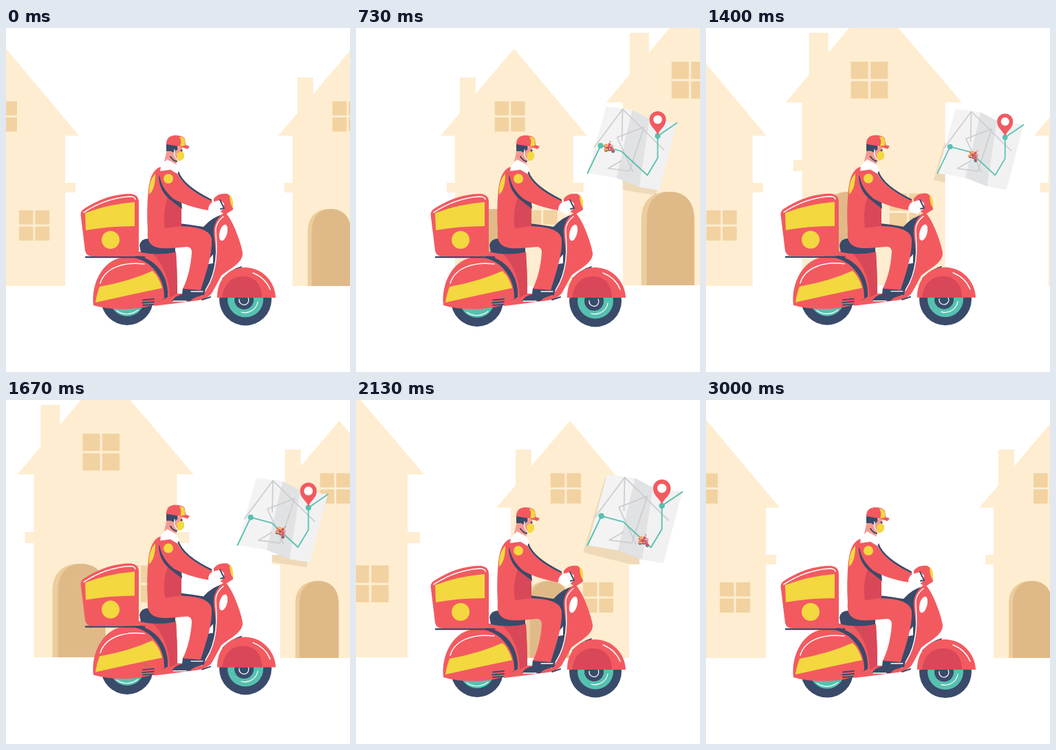
Recreate the animation shown at these times as an HTML page with a canvas. Size 500 by 500 pixels, loop 3030 ms.

```html
<!DOCTYPE html>
<html lang="en">
<head>
<meta charset="utf-8">
<title>Delivery ride</title>
<style>
html, body { margin: 0; width: 100%; height: 100%; overflow: hidden; background: #fff; }
canvas { display: block; width: 500px; height: 500px; }
</style>
</head>
<body>
<canvas width="500" height="500"></canvas>
<script>
const ctx = document.querySelector('canvas').getContext('2d');
const LOOP = 3030, STEP = 100 / 3;
const RED = '#f25a60', DARK = '#d94858', NAVY = '#3a4a6a', YELLOW = '#f3d83f',
  TEAL = '#56c1b0', SKIN = '#f59a92', WALL = '#feedd0', PANE = '#f2d2a0',
  DOOR = '#dfba88', FRAME = '#eccd9b', ROAD = '#cccdd0';

const fill = (color, d) => { ctx.fillStyle = color; ctx.fill(new Path2D(d)); };
const line = (color, width, d) => {
  ctx.strokeStyle = color; ctx.lineWidth = width; ctx.stroke(new Path2D(d));
};
const dot = (color, x, y, r) => {
  ctx.fillStyle = color; ctx.beginPath(); ctx.arc(x, y, r, 0, 7); ctx.fill();
};
const at = (x, y, draw) => { ctx.save(); ctx.translate(x, y); draw(); ctx.restore(); };

// Smoothly interpolates between [step, value] pairs.
function ease(keys, n) {
  const i = keys.findIndex(k => k[0] >= n);
  if (i < 0) return keys[keys.length - 1][1];
  if (i === 0) return keys[0][1];
  const [a, u] = keys[i - 1], [b, v] = keys[i];
  return u + (v - u) * (1 - Math.cos(Math.PI * (n - a) / (b - a))) / 2;
}

function panes(x, y, size, pitch) {
  ctx.fillStyle = PANE;
  for (let i = 0; i < 4; i++)
    ctx.fillRect(x + (i & 1) * pitch, y + (i >> 1) * pitch, size, size);
}

function smallHouse() {
  fill(WALL, 'M0 30L106 156.500H86V225H101V239H86V375H-86V239H-98V225H-86V156.500H-107L-79 124V72H-56V96Z');
  panes(-28, 106.5, 20.5, 23.5);
  panes(19, 265, 20.5, 23.5);
  fill(FRAME, 'M-64 375V296C-64 274 -51 263 -32 263S-1 274 -1 296V375Z');
  fill(DOOR, 'M-58 375V296C-58 274 -46 263 -30 263S-1 274 -1 296V375Z');
}

function bigHouse() {
  fill(WALL, 'M-36 0H36L128 108H104V192H122V208H104V374H-104V208H-117V192H-104V108H-128L-94 68V7H-66V36Z');
  panes(-33, 49, 25, 28.5);
  panes(23, 240.5, 25, 28.5);
  fill(FRAME, 'M-77 374V278C-77 251 -61 238 -38 238S0 251 0 278V374Z');
  fill(DOOR, 'M-69 374V278C-69 251 -55 238 -35 238S0 251 0 278V374Z');
}

function wheels() {
  dot(NAVY, 176, 394, 38);
  dot(TEAL, 176, 394, 25);
  line('#fff', 1.2, 'M161 411Q176 421 192 410');
  dot(NAVY, 348, 394.5, 38);
  dot(TEAL, 348, 394.5, 26);
  line('#fff', 1.2, 'M366 398A19 19 0 0 1 342 413');
  dot(NAVY, 346, 395, 14);
  line('#fff', 1.2, 'M352 392A7 7 0 1 1 339 394');
}

function scooter() {
  // Inner shield and far leg
  fill(NAVY, 'M252 284Q270 286 287 289Q300 274 319 270L307 300Q314 345 302 374L290 390H262L275 370L290 320Q296 300 253 291Z');
  fill('#fff', 'M301 329L288 344L301 342Z');
  fill(NAVY, 'M314 364Q328 350 343 346L340 356L318 374Z');
  // Rear body and floor
  fill(RED, 'M190 325H247Q249 355 249 386L284 387Q301 372 305 342C307 316 299 302 303 287Q308 273 318 268C330 277 344 320 344 328C344 342 322 352 313 360L301 382Q296 393 278 396L240 401L215 404Z');
  fill(DARK, 'M212 327H247Q249 355 249 386L238 392Q237 350 212 327Z');
  line('#fff', 1.5, 'M316 274Q303 284 305 299C308 335 304 366 284 389');
  line(NAVY, 2, 'M285 395L297 391');
  fill(NAVY, 'M170 330C208 326 237 352 235 391L224 397Z');
  fill(RED, 'M127 403C123 372 141 333 176 333C207 333 231 360 230 393L222 399C198 411 154 411 127 403Z');
  line('#fff', 1.5, 'M137 371C143 350 169 339 201 343');
  fill(YELLOW, 'M136 376Q180 368 213 353Q222 361 227 378Q178 388 130 399Q132 386 136 376Z');
  line(NAVY, 1.8, 'M199 395.500L215 394M198 399.500L215 398M199 403L214 402');
  // Seat and cargo box
  fill(NAVY, 'M194 316Q196 306 207 306L246 318V326Q220 331 196 326Z');
  line(NAVY, 2.5, 'M116 333H201');
  fill(RED, 'M113 263Q147 241 181 241Q193 242 193 253V326Q193 332 187 332H126Q117 332 115 324L109 275Q107 267 113 263Z');
  line('#fff', 1.5, 'M113 268Q145 247 180 245Q187 245 188 249');
  fill(YELLOW, 'M115 269Q149 256 187 253V288Q149 288 116 294Z');
  dot(YELLOW, 152, 308, 13);
  // Front fender
  fill(RED, 'M307 392C306 365 325 348 347 348C372 348 391 368 392 392Z');
  fill(DARK, 'M314 392C317 371 328 361 345 361C362 361 372 374 372 392Z');
  line('#fff', 1.5, 'M359 356Q377 363 384 380');
  // Steering head
  fill(RED, 'M302 248Q309 239 322 241Q330 246 330 264L319 271L302 262Z');
  fill(YELLOW, 'M325 242Q331 247 330 262Q325 256 325 242Z');
  ctx.fillStyle = '#fff';
  ctx.beginPath();
  ctx.ellipse(316, 297.5, 5.5, 12, 0.25, 0, 7);
  ctx.fill();
}

function courier() {
  // Shoes, legs, torso
  fill(NAVY, 'M241 397Q246 389 256 387L257 378H270Q280 382 290 379L288 388Q272 391 268 397Z');
  line('#fff', 1.3, 'M269 383H286M243 397H262');
  fill(RED, 'M224 202Q210 207 207 235Q204 265 206 295C204 315 214 322 240 320L264 318Q270 319 270 326C269 343 265 363 257 379L283 381C291 355 300 330 299 307C297 292 275 289 255 288V240L247 207Z');
  fill(DARK, 'M235 246Q227 268 231 291L255 288V252Z');
  fill(YELLOW, 'M217 212Q207 222 208 242Q217 235 217 212Z');
  // Arm
  fill(NAVY, 'M222 214Q222 236 238 249Q248 257 256 263L255 252L235 234Z');
  fill(RED, 'M223 209Q235 201 248 209Q256 231 300 252L294 265Q261 259 243 248Q223 231 223 209Z');
  line(NAVY, 2.5, 'M250 209Q257 230 298 250');
  dot(YELLOW, 236, 219, 7);
  fill('#fff', 'M294 262Q296 253 304 252L311 250L317 255L316 263L307 271Q299 268 294 264Z');
  line(NAVY, 2, 'M311 250L317 262L312 263');
  // Head
  fill(SKIN, 'M234 176L256 172L257 187L248 194L247 204L230 194Z');
  fill('#fff', 'M225 201L234 191L247 198L252 206L249 212L239 206L224 208Z');
  fill(NAVY, 'M233 166L250 168L249 177L243 181L240 179H233Z');
  line(NAVY, 2, 'M239 187Q243 193 248 194');
  line('#fff', 1.3, 'M245 177Q243 187 250 192');
  fill(YELLOW, 'M248 183L254 179L259 182L259 188Q256 194 250 193Z');
  dot(NAVY, 255, 178, 1.5);
  fill(RED, 'M233 169Q233 157 245 156Q257 156 260 161L261 170L267 172L264 176L251 172L233 169Z');
  fill(YELLOW, 'M252 158Q260 158 260 164V171L253 172Q256 165 252 158Z');
}

function rider(wheelY) {
  at(0, wheelY, wheels);
  at(0, Math.min(0, wheelY * 0.85), () => { scooter(); courier(); });
}

const ROUTE = [[355, 172], [385, 180], [423, 215], [438, 190], [438, 158]];

function alongRoute(dist) {
  for (let i = 1; i < ROUTE.length; i++) {
    const [x, y] = ROUTE[i - 1], dx = ROUTE[i][0] - x, dy = ROUTE[i][1] - y;
    const len = Math.hypot(dx, dy);
    if (dist <= len) return [x + dx * dist / len, y + dy * dist / len];
    dist -= len;
  }
  return ROUTE[ROUTE.length - 1];
}

const PULSE = [[0, 1], [22, 1], [34, .915], [50, 1.01], [64, 1.06], [76, .915], [90, 1]];
const POP = [[5, 0], [13, 1], [80, 1], [88, 0]];
const TILT = [[22, .15], [34, .6], [50, .65], [64, .3], [76, .15]];
const BOUNCE = [[0, 0], [8, -3], [16, .5], [22, 2], [33, 4], [50, -4], [57, 4],
  [64, 0], [70, 4], [76, 0], [83, 3], [90, .6]];

function mapSheet(n) {
  const pop = ease(POP, n), pulse = ease(PULSE, n);
  if (pop <= 0) return;
  ctx.save();
  ctx.translate(400, 176);
  ctx.scale(pop, pop);
  ctx.translate(-400, -176);
  ctx.translate(336.5, 211);
  ctx.scale(pulse, pulse);
  ctx.translate(-336, -212);
  // The shadow falls on the houses only
  ctx.globalCompositeOperation = 'source-atop';
  fill('rgba(190,160,110,.24)', 'M360 120L465 145L435 244L390 237L330 222Z');
  ctx.globalCompositeOperation = 'source-over';
  fill('#f3f3f4', 'M363 115L401 120L378 219L336 212Z');
  fill('#e1e2e4', 'M401 120L426 133L411 232L378 219Z');
  fill('#f1f1f2', 'M426 133L466 139L440 237L411 232Z');
  line(ROAD, 1.7, 'M346 174L387 119L386 164M387 119L447 178M402 210L379 160L418 145L397 209L366 205L385 194');
  line(TEAL, 1.8, 'M336 212L355 172L385 180L423 215L438 190V158L466 139');
  dot(TEAL, 355, 172, 4);
  dot(TEAL, 438, 158, 4);
  fill(RED, 'M438 157C436 148 426 145 426 134A12 12 0 0 1 450 134C450 145 440 148 438 157Z');
  dot('#fff', 438, 134, 6.3);
  const [x, y] = alongRoute(Math.max(0, 1.36 * (n - 12)));
  ctx.translate(x, y - 2);
  ctx.rotate(ease(TILT, n));
  ctx.scale(.06, .06);
  ctx.translate(-250, -295);
  rider(0);
  ctx.restore();
}

function draw(now) {
  const n = Math.floor((now % LOOP + 5) / STEP);
  const scroll = 12.4 * Math.min(n, 76) + 11.5 * Math.max(0, n - 76);
  ctx.clearRect(0, 0, 500, 500);
  for (const x of [0, 502.5, 1104.5, 1607.5]) at(x - scroll, 0, smallHouse);
  at(764.5 - scroll, 0, bigHouse);
  mapSheet(n);
  rider(ease(BOUNCE, n));
}

const start = performance.now();
function tick() {
  draw(performance.now() - start);
  requestAnimationFrame(tick);
}
ctx.lineCap = ctx.lineJoin = 'round';
tick();
</script>
</body>
</html>
```
